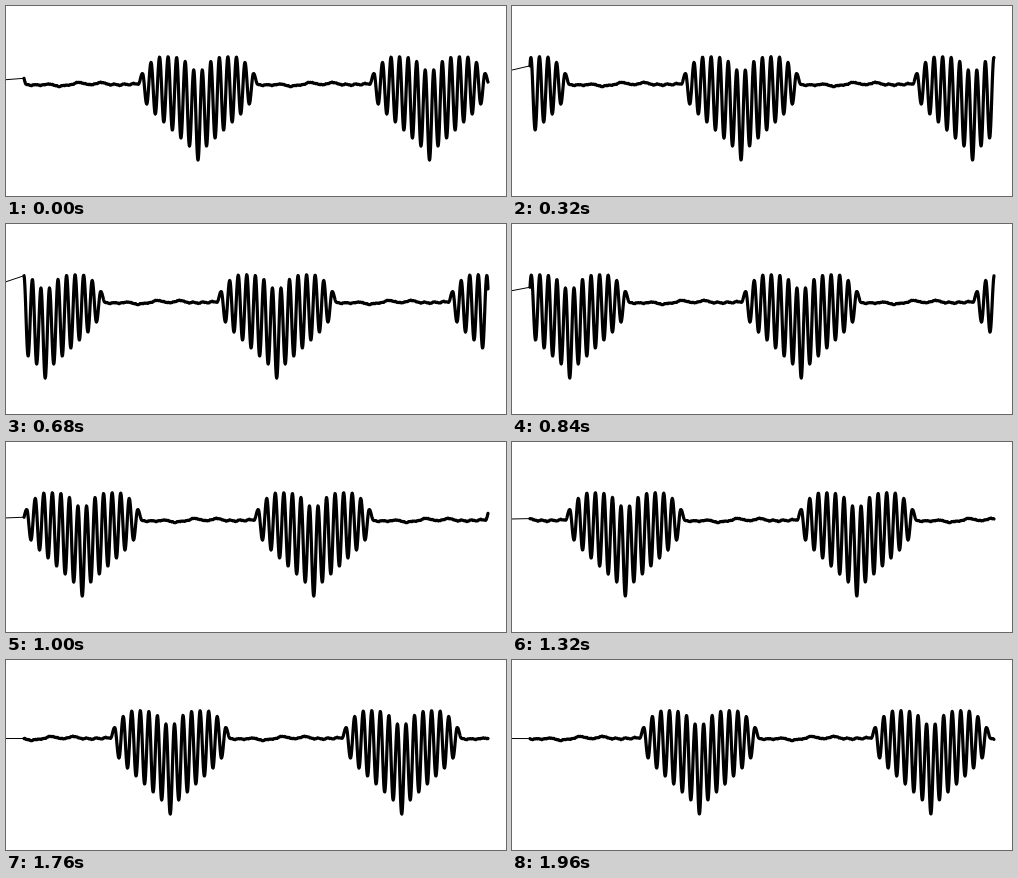
These frames come from a looping animation (500x190 px, 2 s). An HTML page with a canvas:

```html
<!DOCTYPE html>
<html lang="en">
<head>
<meta charset="utf-8">
<title>Heart wave</title>
<style>
html, body { margin: 0; width: 100%; height: 100%; overflow: hidden; background: #fff; }
canvas { display: block; }
</style>
</head>
<body>
<canvas id="stage" width="500" height="190"></canvas>
<script>
const ctx = document.getElementById('stage').getContext('2d');
const LOOP = 2000, STEP = 40, PERIOD = 231.5;
const LEFT = 18, RIGHT = 482, BASE = 78.3, PIVOT_X = -61;
const HALF = 4.27; // distance between a crest and the next trough

// Crests and troughs from the heart's tip outwards, the same on both sides
const heart = [154, 64, 140, 55.5, 132, 51.5, 124, 50.7, 116, 51.2, 108, 56.5, 98, 67.5, BASE];
const edge = (heart.length - 1) * HALF;

// Resting line between two hearts
const rest = [78.3, 79.5, 78.5, 79.4, 78.5, 78, 79.2, 80.6, 79.4, 79.2, 78.3, 76.2, 77,
  78.2, 78.8, 77.6, 76.2, 77.4, 79, 78, 79.5, 77.8, 79, 77.4, 78.3];
const gap = (PERIOD - 2 * edge) / (rest.length - 1);

function waveY(offset) {
  const o = offset - PERIOD * Math.round(offset / PERIOD);
  const a = Math.abs(o);
  if (a < edge) {
    const k = a / HALF, i = Math.floor(k);
    const mix = (1 - Math.cos((k - i) * Math.PI)) / 2;
    return heart[i] + (heart[i + 1] - heart[i]) * mix;
  }
  const d = (o < 0 ? o + PERIOD : o) - edge;
  const k = Math.max(0, d / gap);
  const i = Math.min(Math.floor(k), rest.length - 2);
  const ripple = 0.35 * Math.sin(d * 2.1) * Math.sin(d * 0.77);
  return rest[i] + (rest[i + 1] - rest[i]) * (k - i) + ripple;
}

function draw(now) {
  const t = Math.floor((now % LOOP) / STEP) * STEP;
  const tip = 192 + PERIOD * t / LOOP;

  ctx.fillStyle = '#fff';
  ctx.fillRect(0, 0, 500, 190);
  ctx.strokeStyle = '#000';
  ctx.lineCap = ctx.lineJoin = 'round';

  // Pen arm
  ctx.lineWidth = 1;
  ctx.beginPath();
  ctx.moveTo(PIVOT_X, BASE);
  ctx.lineTo(LEFT, waveY(LEFT - tip));
  ctx.stroke();

  // Trace
  ctx.lineWidth = 3.2;
  ctx.beginPath();
  for (let x = LEFT; x <= RIGHT; x += 0.25) ctx.lineTo(x, waveY(x - tip));
  ctx.stroke();
}

const start = performance.now();
function tick() {
  draw(performance.now() - start);
  requestAnimationFrame(tick);
}
tick();
</script>
</body>
</html>
```
